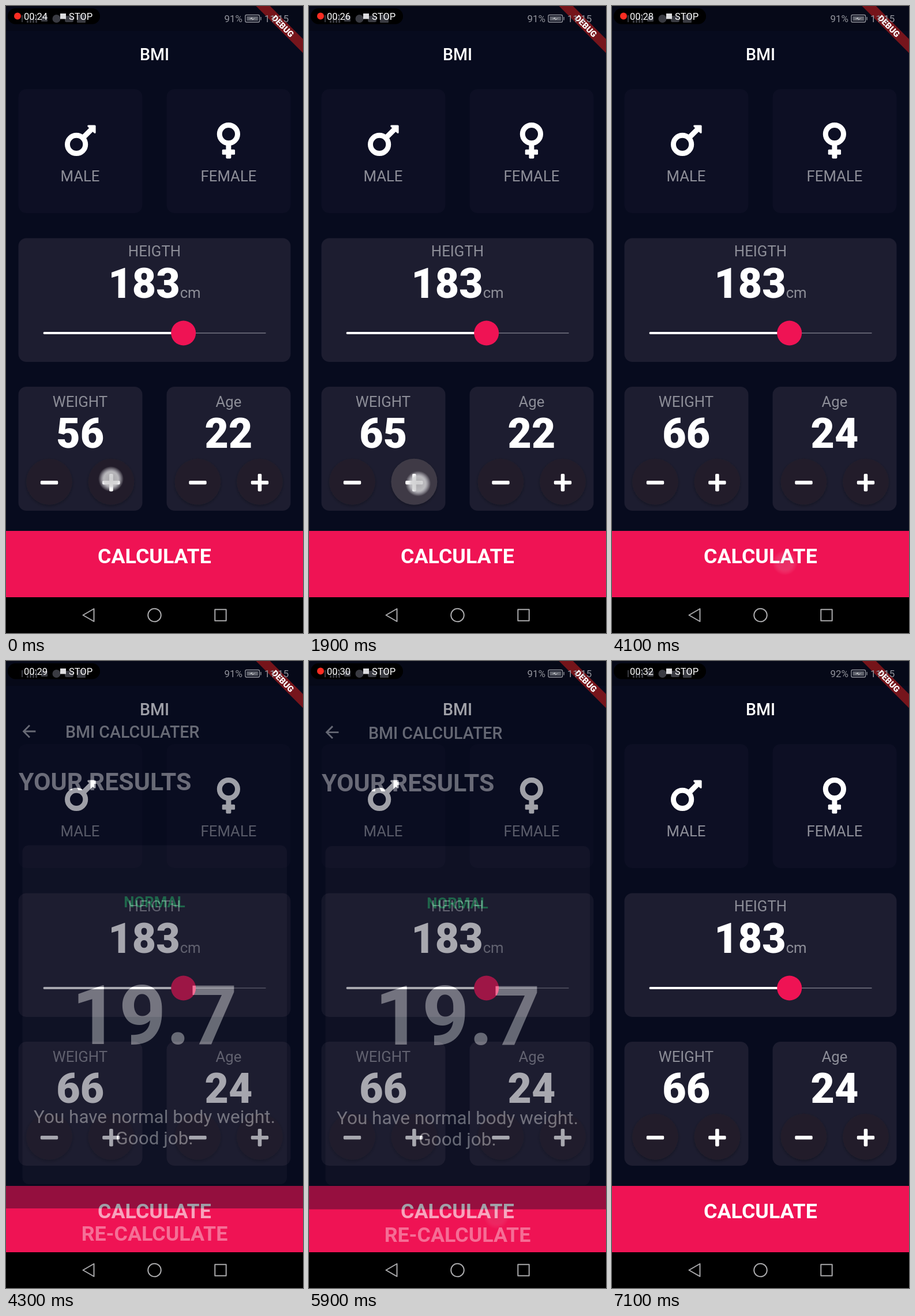
Write an HTML page that moves like this. It is 515 px wide and 1087 px high and loops after 7600 ms.

```html
<!DOCTYPE html>
<html lang="en">
<head>
<meta charset="utf-8">
<title>BMI</title>
<style>
  html, body { margin: 0; width: 100%; height: 100%; overflow: hidden; background: #070b1e; }
  svg { display: block; width: 100vw; height: 100vh; font-family: Roboto, "Liberation Sans", sans-serif; }
  text { fill: #fff; }
  .mid { text-anchor: middle; }
  .bar { font-size: 28.6px; font-weight: 500; }
  .label { font-size: 25.75px; fill: #8d8e98; }
  .num { font-size: 71.5px; font-weight: 900; }
  .cta { font-size: 35.8px; font-weight: 700; }
  .note { font-size: 31.5px; }
  .status { font-size: 17px; fill: #92949c; }
  .rec { font-size: 16.5px; }
  .card { fill: #1d1d30; }
  .idle { fill: #0d0f24; }
  .pink { fill: #ef1354; }
  .white { fill: #fff; }
</style>
</head>
<body>
<svg viewBox="0 0 515 1087" preserveAspectRatio="none">
  <defs>
    <radialGradient id="glow">
      <stop offset="0" stop-color="#c4c4c6" stop-opacity=".82"/>
      <stop offset=".58" stop-color="#d2d2d4" stop-opacity=".85"/>
      <stop offset=".7" stop-color="#e6e6ea" stop-opacity=".6"/>
      <stop offset="1" stop-color="#fff" stop-opacity="0"/>
    </radialGradient>
    <filter id="soft" x="-30%" y="-30%" width="160%" height="160%">
      <feDropShadow dx="0" dy="2" stdDeviation="2.5" flood-color="#000" flood-opacity=".28"/>
    </filter>
  </defs>

  <g id="home">
    <rect width="515" height="1025" fill="#070b1e"/>
    <text class="bar mid" x="257.5" y="94">BMI</text>

    <rect class="idle" x="21.5" y="144" width="215" height="215" rx="14"/>
    <rect class="idle" x="278.5" y="144" width="215" height="215" rx="14"/>
    <g transform="translate(102 197.5) scale(.1396)" fill="none" stroke="#fff" stroke-width="64">
      <circle cx="144" cy="304" r="112"/>
      <path d="M224 224L330 118"/>
      <path fill="#fff" stroke="none" d="M293 64h79q12 0 12 12v79c0 10.7-12.9 16-20.4 8.5L284.5 84.4C277 76.9 282.3 64 293 64z"/>
    </g>
    <g transform="translate(365.8 197.5) scale(.1396)" fill="#fff">
      <circle cx="144" cy="176" r="112" fill="none" stroke="#fff" stroke-width="64"/>
      <rect x="112" y="300" width="64" height="180" rx="12"/>
      <rect x="64" y="368" width="160" height="64" rx="12"/>
    </g>
    <text class="label mid" x="128.5" y="304">MALE</text>
    <text class="label mid" x="386" y="304">FEMALE</text>

    <rect class="card" x="21.5" y="402.5" width="472" height="214.5" rx="14"/>
    <text class="label mid" x="257.5" y="434">HEIGTH</text>
    <text class="mid" x="257.5" y="506"><tspan class="num">183</tspan><tspan class="label">cm</tspan></text>
    <rect class="white" x="64.5" y="565" width="243" height="4" rx="2"/>
    <rect x="307" y="566.4" width="143.5" height="1.2" fill="#8d8e98"/>
    <circle class="pink" cx="307.7" cy="567" r="21.5"/>

    <rect class="card" x="21.5" y="660" width="215" height="215" rx="14"/>
    <rect class="card" x="278.5" y="660" width="215" height="215" rx="14"/>
    <text class="label mid" x="128.5" y="695">WEIGHT</text>
    <text class="label mid" x="386" y="695">Age</text>
    <text class="num mid" x="128.7" y="766" id="weight">56</text>
    <text class="num mid" x="386" y="766" id="age">22</text>
    <g id="buttons"></g>

    <rect class="pink" y="910" width="515" height="115"/>
    <text class="cta mid" x="257.5" y="966">CALCULATE</text>
  </g>

  <g id="result">
    <rect width="515" height="1025" fill="#070b1e"/>
    <path class="white" transform="translate(22.8 65.8) scale(1.43)" d="M20 11H7.83l5.59-5.59L12 4l-8 8 8 8 1.41-1.41L7.83 13H20z"/>
    <text class="bar" x="103" y="94">BMI CALCULATER</text>
    <text x="22" y="185" font-size="42.9" font-weight="700">YOUR RESULTS</text>
    <rect class="card" x="28.5" y="280.5" width="458.5" height="587.5" rx="11"/>
    <text class="mid" x="257.5" y="388" font-size="25.75" font-weight="700" style="fill:#24d876">NORMAL</text>
    <text class="mid" x="257.5" y="624.5" font-size="143" font-weight="700">19.7</text>
    <text class="note mid" x="257.5" y="762">You have normal body weight.</text>
    <text class="note mid" x="257.5" y="799">Good job.</text>
    <rect class="pink" y="910" width="515" height="115"/>
    <text class="cta mid" x="257.5" y="966">RE-CALCULATE</text>
  </g>

  <rect width="515" height="43" fill="#000" opacity=".2"/>
  <path d="M433.5 0h24.3L515 57.2v24.3z" fill="#b71c1c" fill-opacity=".627"/>
  <text class="mid" transform="translate(480.3 34.9) rotate(45)" y="5.2" font-size="14.6" font-weight="900">DEBUG</text>
  <text class="status" x="378.5" y="28" id="battery">91%</text>
  <g fill="none" stroke="#92949c" stroke-width="1.4">
    <rect x="415" y="15.5" width="24.5" height="12.5" rx="2"/>
    <path d="M442 19v5.5"/>
    <rect x="417.5" y="18" width="19.5" height="7.5" fill="#60636d" stroke="none"/>
    <path d="M421 22.5l6-2.5v3l6-2.5-6 4v-2.500z" fill="#d0d1d6" stroke="none"/>
  </g>
  <text class="status" x="448" y="28">11:15</text>

  <rect x="3" y="4" width="160" height="27.500" rx="13.500" fill="#000"/>
  <g fill="#3a3b42">
    <path d="M27 16h2v12h-2zM36 25h3v4h-3zM41 22h3v7h-3zM46 19h3v10h-3zM51 16h3v13h-3z"/>
    <rect x="61" y="17" width="11" height="10" rx="1"/>
    <circle cx="87.5" cy="22" r="7"/>
    <rect x="102" y="17" width="15" height="11" rx="3"/>
    <rect x="123" y="15" width="15" height="14" rx="1"/>
  </g>
  <circle id="dot" cx="20" cy="17.500" r="6" fill="#fb2d22"/>
  <text class="rec" x="31" y="24" id="clock">00:24</text>
  <rect x="94" y="13" width="10" height="9.500" fill="#dcdcde"/>
  <text class="rec" x="109" y="24">STOP</text>

  <rect y="1025" width="515" height="62" fill="#000"/>
  <g fill="none" stroke="#a9a9ab" stroke-width="2" stroke-linejoin="round">
    <path d="M133.500 1056l19-11v22z"/>
    <circle cx="257.500" cy="1056" r="11.300"/>
    <rect x="362.300" y="1046.300" width="19.400" height="19.400"/>
  </g>
  <circle id="touch" r="22" fill="url(#glow)"/>
</svg>
<script>
const LOOP = 7600, STEP = 100;
const $ = id => document.getElementById(id);
const clamp = v => Math.max(0, Math.min(1, v));

// Round buttons: each has a press highlight between disc and sign
const sign = (x, plus) =>
  `<rect class="white" x="${x - 15.2}" y="823" width="30.4" height="6.6" rx="1.800"/>` +
  (plus ? `<rect class="white" x="${x - 3.3}" y="811" width="6.6" height="30.500" rx="1.800"/>` : "");
$("buttons").innerHTML = [[75, 0], [182.4, "hotWeight"], [332.5, 0], [440, "hotAge"]].map(([x, id]) =>
  `<circle cx="${x}" cy="824.7" r="40" fill="#211f2c" filter="url(#soft)"/>` +
  (id ? `<circle id="${id}" cx="${x}" cy="824.7" r="40" fill="#fff"/>` : "") + sign(x, id)).join("");

// Taps: place, press time, release time
const weightTaps = Array.from({ length: 10 }, (_, k) => {
  const up = 90 + 215 * k;
  return { x: 182 + 0.8 * k, y: 820 + Math.min(8, 1.6 * k), down: up - 130, up };
});
const ageTaps = [
  { x: 418.500, y: 829, down: 2750, up: 2950 },
  { x: 421, y: 828, down: 3150, up: 3280 }
];
const pageTaps = [
  { x: 300, y: 965, down: 3800, up: 3970 },
  { x: 325, y: 963, down: 5400, up: 5760 }
];
const allTaps = [...weightTaps, ...ageTaps, ...pageTaps];

const held = (tap, t, fade) => t < tap.down ? 0 : t <= tap.up ? 1 : clamp(1 - (t - tap.up) / fade);
const count = (taps, t) => taps.filter(p => p.up <= t).length;
const heat = (taps, t) => Math.max(...taps.map(p =>
  clamp((t - p.down - 50) / 60) * held(p, t, 360)));

function bezier(x1, y1, x2, y2) {
  const at = (a, b, s) => 3 * a * s * (1 - s) ** 2 + 3 * b * s * s * (1 - s) + s ** 3;
  return x => {
    let lo = 0, hi = 1;
    for (let i = 0; i < 30; i++) {
      const m = (lo + hi) / 2;
      if (at(x1, x2, m) < x) lo = m; else hi = m;
    }
    return at(y1, y2, lo);
  };
}
const slide = bezier(0.4, 0, 0.2, 1);
const fade = bezier(0.42, 0, 1, 1);

const ticks = [200, 1210, 2150, 3160, 4110, 5100, 6090, 7090];
const OPEN = 4130, CLOSE = 5768, PAGE_MS = 300;

function draw(t) {
  $("weight").textContent = 56 + count(weightTaps, t);
  $("age").textContent = 22 + count(ageTaps, t);
  $("hotWeight").setAttribute("opacity", 0.18 * heat(weightTaps, t));
  $("hotAge").setAttribute("opacity", 0.18 * heat(ageTaps, t));

  const passed = ticks.filter(k => k <= t);
  $("clock").textContent = "00:" + (24 + passed.length);
  $("dot").style.display = passed.length && t < passed[passed.length - 1] + 450 ? "none" : "";
  $("battery").textContent = t < 6400 ? "91%" : "92%";

  const p = t < CLOSE ? clamp((t - OPEN) / PAGE_MS) : clamp(1 - (t - CLOSE) / PAGE_MS);
  $("result").style.display = p > 0 ? "" : "none";
  $("result").setAttribute("opacity", fade(p));
  $("result").setAttribute("transform", `translate(0 ${256 * (1 - slide(p))})`);

  const tap = allTaps.filter(q => q.down <= t).pop();
  $("touch").setAttribute("cx", tap.x);
  $("touch").setAttribute("cy", tap.y);
  $("touch").setAttribute("opacity", held(tap, t, 160));
}

const start = performance.now();
function frame() {
  const t = (performance.now() - start) % LOOP;
  draw(Math.floor(t / STEP) * STEP);
  requestAnimationFrame(frame);
}
draw(0);
requestAnimationFrame(frame);
</script>
</body>
</html>
```
